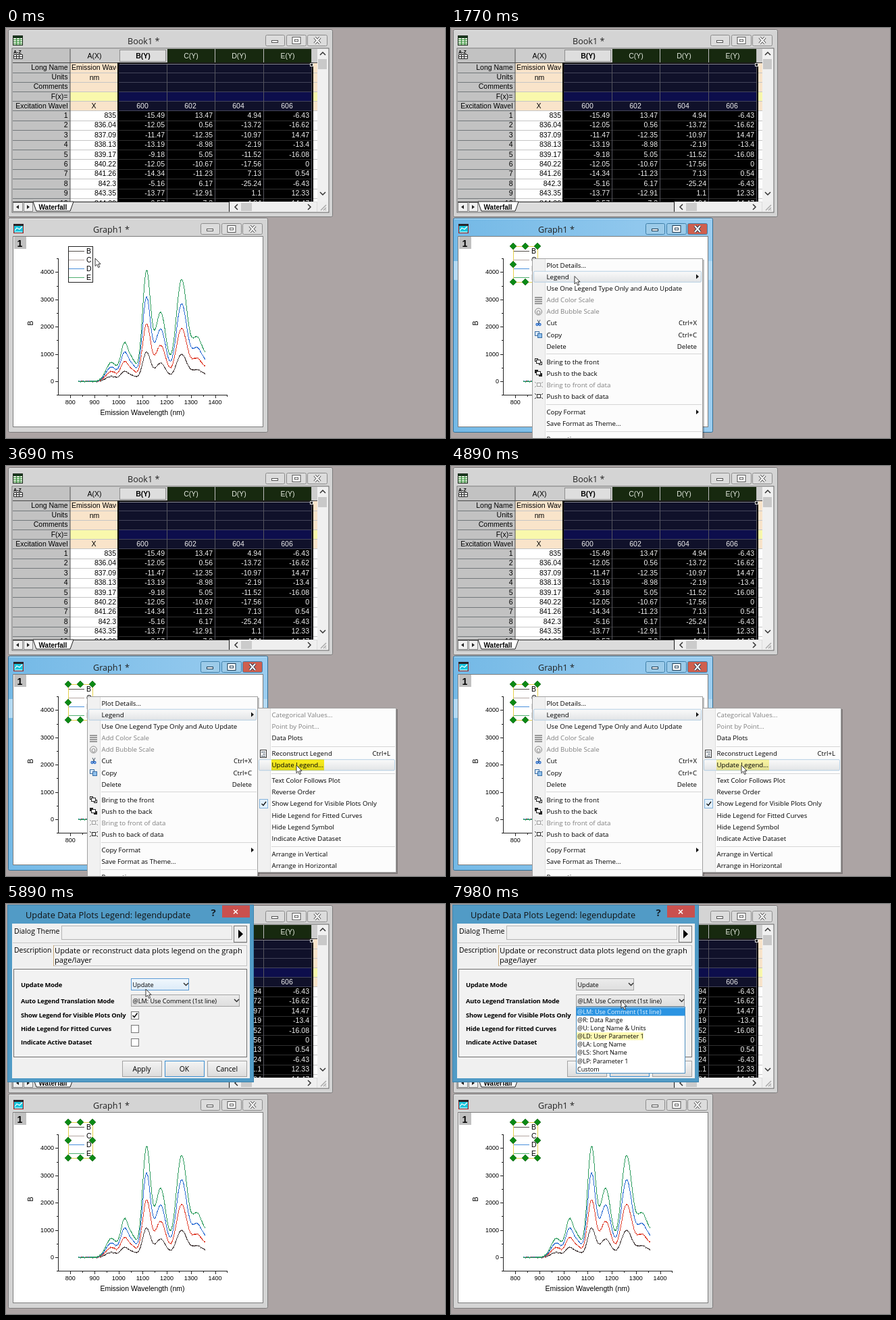
Recreate the animation shown at these times as an HTML page. Size 650 by 607 pixels, loop 8 s.

```html
<!DOCTYPE html>
<html lang="en">
<head>
<meta charset="utf-8">
<title>Legend update</title>
<style>
html, body { margin: 0; width: 100%; height: 100%; overflow: hidden; background: #aca4a4; }
svg { display: block; width: 100vw; height: 100vh; }
text { white-space: pre; }
.ui { font-family: "Open Sans", "Noto Sans", sans-serif; }
.grid { font-family: "Liberation Sans", Arial, sans-serif; }
.mark { mix-blend-mode: multiply; fill: #fff21c; }
</style>
</head>
<body>
<svg id="stage" viewBox="0 0 650 607" xmlns="http://www.w3.org/2000/svg"></svg>
<script>
const LOOP = 8000;

// --- drawing helpers ---
const rect = (x, y, w, h, fill, stroke = 'none', extra = '') =>
  `<rect x="${x}" y="${y}" width="${w}" height="${h}" fill="${fill}" stroke="${stroke}" ${extra}/>`;
const box = (x, y, w, h, fill, stroke, extra) => rect(x + .5, y + .5, w - 1, h - 1, fill, stroke, extra);
const path = (d, stroke, width = 1, fill = 'none', extra = '') =>
  `<path d="${d}" stroke="${stroke}" stroke-width="${width}" fill="${fill}" ${extra}/>`;
const text = (x, y, s, size, { cls = 'ui', fill = '#000', anchor = 'start', weight = 400, extra = '' } = {}) =>
  `<text x="${x}" y="${y}" class="${cls}" font-size="${size}" fill="${fill}" text-anchor="${anchor}" font-weight="${weight}" ${extra}>${s}</text>`;
const cell = (x, y, s, o = {}) => text(x, y, s, o.size || 10.5, { cls: 'grid', ...o });
const group = (id, body, extra = '') => `<g id="${id}" ${extra}>${body}</g>`;
const hline = (x1, x2, y, c) => path(`M${x1} ${y}H${x2}`, c);
const vline = (x, y1, y2, c) => path(`M${x} ${y1}V${y2}`, c);
const gradient = (id, from, to, x2 = 0) =>
  `<linearGradient id="${id}" x2="${x2}" y2="${1 - x2}"><stop stop-color="${from}"/><stop offset="1" stop-color="${to}"/></linearGradient>`;

const defs = `<defs>
  ${gradient('button', '#f4f4f4', '#dcdcdc')}${gradient('combo', '#ececec', '#dedede')}
  ${gradient('comboHot', '#f0f7fd', '#dcebf8')}${gradient('hover', '#fafafa', '#e2e4e6')}
  ${gradient('activeFrame', '#74b9e6', '#9bcdf0', 1)}
  <clipPath id="sheet"><rect x="10" y="31" width="451" height="226"/></clipPath>
  <clipPath id="nameCell"><rect x="96" y="52" width="67.5" height="14"/></clipPath>
  <clipPath id="dropClip"><rect id="dropArea" x="184" y="152" width="165" height="102"/></clipPath>
</defs>`;

// --- windows ---
function frame(x, y, w, h, title, titleX, active) {
  const r = x + w, ink = active ? '#1c3a52' : '#555';
  const button = (bx, bw, fill) => box(bx, y + 8, bw, 17, fill, active ? '#3f7fa8' : '#8c8c8c', 'rx="2"');
  const plain = active ? '#9ccbe9' : '#dcdcdc';
  return box(x, y, w, h, active ? 'url(#activeFrame)' : '#d4d4d4', active ? '#2f6f98' : '#7c7c7c', 'rx="2"')
    + hline(x + 2, r - 2, y + 1.5, active ? '#c4e3f6' : '#ededed')
    + button(r - 100, 29, plain) + button(r - 69, 30, plain) + button(r - 38, 30, active ? '#cf5f4e' : plain)
    + rect(r - 90.5, y + 16.5, 9, 3, '#fff', ink)
    + rect(r - 60, y + 11.5, 12, 10, '#fff', ink) + rect(r - 56.5, y + 15, 5, 3, 'none', ink)
    + path(`M${r - 27} ${y + 12}l8 9m0-9l-8 9`, ink, 4) + path(`M${r - 27} ${y + 12}l8 9m0-9l-8 9`, '#fff', 2)
    + text(titleX, y + 21.5, title, 12.6, { fill: '#222' });
}

function book() {
  const top = 122.3, pitch = 14.4;
  const columns = [167, 238, 309, 381, 452];
  const rows = `835 -15.49 13.47 4.94 -6.43|836.04 -12.05 0.56 -13.72 -16.62|837.09 -11.47 -12.35 -10.97 14.47
838.13 -13.19 -8.98 -2.19 -13.4|839.17 -9.18 5.05 -11.52 -16.08|840.22 -12.05 -10.67 -17.56 0
841.26 -14.34 -11.23 7.13 0.54|842.3 -5.16 6.17 -25.24 -6.43|843.35 -13.77 -12.91 1.1 12.33
844.39 -0.57 7.3 -4.94 14.47`.split(/[|\n]/).map(r => r.split(' '));
  const labels = ['Long Name', 'Units', 'Comments', 'F(x)=', 'Excitation Wavel'];
  const headY = i => 62 + i * 14.2;
  let s = frame(3, 2, 481, 278, 'Book1 *', 180, false) + rect(9, 30, 469, 243, '#f0f0f0', '#666');
  let g = rect(10, 31, 85, 226, '#c2c2c2') + rect(95, 31, 366, 21, '#cdcdcd')
    + rect(95, 52, 366, 71, '#f9e4ca') + rect(95, 94, 366, 14, '#f9f8ac') + rect(95, 122, 366, 135, '#fff')
    + rect(167, 52, 286, 71, '#10112a') + rect(167, 94, 286, 14, '#0d0e4c') + rect(167, 122, 286, 135, '#000')
    + rect(238, 31, 215, 20, '#17290f')
    + rect(168.5, 32.5, 68, 17, '#dedede', '#444', 'stroke-dasharray="1 1"');
  for (let i = 0; i < 15; i++) {
    const y = Math.round(i < 5 ? 66 + i * 14.1 : top + (i - 4) * pitch) + .5;
    g += hline(10, 95, y, '#72777a') + hline(95, 167, y, '#c6c6c6') + hline(167, 453, y, i < 5 ? '#44455a' : '#303030') + hline(453, 461, y, '#c6c6c6');
  }
  g += hline(10, 461, 51.5, '#444') + vline(95, 31, 257, '#555');
  columns.slice(1).forEach(x => g += vline(x + .5, 31, 51, '#bbb') + vline(x + .5, 52, 257, '#55555e'));
  // selection outline
  g += path('M166 257V52.5H454V257', '#000', 2) + hline(168, 451, 53.5, '#8a8a94');
  ['A(X)', 'B(Y)', 'C(Y)', 'D(Y)', 'E(Y)'].forEach((h, i) =>
    g += cell(i ? columns[i - 1] + 36 : 131, 45, h, { anchor: 'middle', fill: i > 1 ? '#e4eadf' : '#000', weight: i == 1 ? 700 : 400 }));
  labels.forEach((l, i) => g += cell(91.5, headY(i), l, { anchor: 'end' }));
  g += `<g clip-path="url(#nameCell)">${cell(97, 62, 'Emission Wavelength')}</g>`
    + cell(131, 77, 'nm', { anchor: 'middle' }) + cell(130, 119, 'X', { anchor: 'middle' });
  [600, 602, 604, 606].forEach((n, i) => g += cell(columns[i] + 35, 119, n, { anchor: 'middle', fill: '#eee' }));
  rows.forEach((row, r) => {
    const y = 133 + r * pitch;
    g += cell(91.5, y, r + 1, { anchor: 'end' });
    row.forEach((v, c) => g += cell(c ? columns[c] - 3 : 163, y, v, { anchor: 'end', fill: c ? '#f2f2f2' : '#000' }));
  });
  s += `<g clip-path="url(#sheet)">${g}</g>` + box(450, 52, 5, 5, '#111', '#ddd');
  // sort icon
  s += text(11, 38, 'A-Z', 7, { cls: 'grid', weight: 700 })
    + path('M11.5 39.5h13v6h-13zM15.5 39.5v6M19.5 39.5v6M11.5 42.5h13', '#222', 1, '#fff');
  // scroll bars and sheet tab
  s += rect(461, 31, 16, 226, '#f0f0f0') + rect(462, 46, 13, 15, '#c9c9c9')
    + path('M465 40l4-4 4 4M465 243l4 4 4-4', '#333', 1.5)
    + rect(10, 257, 451, 15, '#dcdcdc') + hline(10, 330, 257.5, '#222')
    + box(10, 258, 15, 14, '#f0f0f0', '#888') + box(26, 258, 14, 14, '#f0f0f0', '#888')
    + path('M19 262v6l-4-3zM31 262v6l4-3z', 'none', 0, '#222')
    + path('M40 257l5 14H95l5-14z', '#222', 1, '#fff') + text(48.5, 268.5, 'Waterfall', 10, { cls: 'grid', weight: 700 })
    + vline(330.5, 257, 272, '#222') + rect(332, 258, 128, 14, '#efefef') + rect(348, 259, 16, 12, '#cbcbcb')
    + path('M343 261l-4 4 4 4M447 261l4 4-4 4', '#333', 1.5)
    + rect(461, 257, 16, 15, '#eee') + path('M466 270l8-8M470 270l4-4M473 270l1-1', '#aaa', 1.5);
  // title icon
  return s + box(10, 11, 15, 15, '#e6f2e0', '#1c2a1c') + rect(11, 12, 13, 3, '#1c3a20')
    + path('M11 17.5h13M11 20.5h13M11 23.5h13M15.5 15v10M20.5 15v10', '#2f8a35');
}

// Emission spectrum: sum of Gaussian peaks in pixels above the zero line.
const peaks = [[156, 28, 8], [175, 50, 5.5], [187, 30, 6.5], [208, 161, 6], [229, 102, 8], [260, 150, 8.2], [283, 62, 8], [300, 30, 7]];
function curve(scale, color, seed) {
  let d = '';
  for (let x = 107; x <= 295; x += .5) {
    const h = peaks.reduce((a, [c, amp, s]) => a + amp * Math.exp(-(((x - c) / s) ** 2) / 2), 0);
    const noise = Math.sin(x * 7.3 + seed) * .35 + Math.sin(x * 3.1 + seed * 2) * .35;
    d += `${d ? 'L' : 'M'}${x} ${(523.3 - h * scale + noise).toFixed(1)}`;
  }
  return path(d, color, 1, 'none', 'shape-rendering="crispEdges"');
}

const series = [['B', '#4d4343', .265], ['C', '#e0402f', .52], ['D', '#2a6cd4', .76], ['E', '#2f9d5f', 1]];
const legendInk = ['#55504c', '#b4a6a2', '#4a90dc', '#4fae70'];

function graphBody() {
  let s = box(10, 308, 371, 283, '#fff', '#7c7c7c')
    + box(11, 290, 15, 14, '#18c4dc', '#a22') + rect(11, 290, 15, 3, '#2a2226') + path('M13 300l3-4 4 2 4-4M13 302h11', '#fff', 1.2)
    + rect(12, 309, 18, 18, '#c0c0c0') + text(20.5, 323.5, '1', 14, { cls: 'grid', weight: 700, anchor: 'middle' });
  s += vline(77.5, 342, 544, '#222') + hline(77, 328, 543.5, '#222');
  for (let i = 0; i < 5; i++) {
    const y = 523 - i * 40.4;
    s += hline(73, 78, Math.round(y) + .5, '#222') + hline(75, 78, Math.round(y + 20.2) + .5, '#222')
      + cell(71, y + 3, i * 1000, { anchor: 'end', size: 9 });
  }
  s += hline(75, 78, 341.5, '#222');
  for (let i = 0; i < 7; i++) {
    const x = 95.3 + i * 35.7;
    s += vline(Math.round(x) + .5, 544, 548, '#222') + vline(Math.round(x + 17.8) + .5, 544, 546, '#222')
      + cell(x, 557, 800 + i * 100, { anchor: 'middle', size: 9 });
  }
  s += cell(202, 573, 'Emission Wavelength (nm)', { anchor: 'middle' })
    + cell(0, 0, 'B', { anchor: 'middle', extra: 'transform="translate(39.5 437) rotate(-90)"' });
  series.forEach(([, color, k], i) => s += curve(k, color, i * 1.7));
  s += group('legendBox', box(92, 323, 37, 54, '#fff', '#222'));
  series.forEach(([name], i) => s += hline(93, 116, 330.5 + i * 13, legendInk[i]) + cell(119, 334 + i * 13, name));
  let h = rect(92.5, 323.5, 36, 53, 'none', '#e6d04c');
  for (const x of [92, 110, 128]) for (const y of [323, 350, 376])
    if (x != 110 || y != 350) h += path(`M${x} ${y - 5}l5 5-5 5-5-5z`, '#0c5c10', .6, '#0b8a14');
  return s + group('handles', h);
}

const graph = () =>
  group('graphIdle', frame(3, 281, 385, 318, 'Graph1 *', 129, false))
  + group('graphActive', frame(3, 281, 385, 318, 'Graph1 *', 129, true) + rect(4, 345, 6, 28, '#b4daf3') + rect(381, 345, 6, 28, '#b4daf3'))
  + graphBody();

// --- menus: [baseline, label, shortcut, disabled] ---
const menuItems = [[354.5, 'Plot Details...'], [371.7, 'Legend'], [389, 'Use One Legend Type Only and Auto Update'],
  [406, 'Add Color Scale', '', 1], [423.2, 'Add Bubble Scale', '', 1], [440.3, 'Cut', 'Ctrl+X'], [457.5, 'Copy', 'Ctrl+C'],
  [474.6, 'Delete', 'Delete'], [497.5, 'Bring to the front'], [514.6, 'Push to the back'], [531.8, 'Bring to front of data', '', 1],
  [549, 'Push to back of data'], [572, 'Copy Format'], [589.2, 'Save Format as Theme...'], [612, 'Properties...']];
const subItems = [[371.7, 'Categorical Values...', '', 1], [389, 'Point by Point...', '', 1], [406, 'Data Plots'],
  [429, 'Reconstruct Legend', 'Ctrl+L'], [446.2, 'Update Legend...'], [469, 'Text Color Follows Plot'], [486.2, 'Reverse Order'],
  [503.4, 'Show Legend for Visible Plots Only'], [520.5, 'Hide Legend for Fitted Curves'], [537.7, 'Hide Legend Symbol'],
  [555, 'Indicate Active Dataset'], [578, 'Arrange in Vertical'], [595, 'Arrange in Horizontal']];

function menuPanel(x, y, w, h, items, seps, hoverId) {
  let s = rect(x + 2, y + 2, w, h, '#000', 'none', 'opacity=".25"') + box(x, y, w, h, '#fcfcfc', '#a0a0a0')
    + rect(x + 1, y + 1, 18, h - 2, '#f1f1f1') + vline(x + 19.5, y + 1, y + h - 1, '#dedede');
  seps.forEach(v => s += hline(x + 21, x + w - 2, v, '#d6d6d6'));
  s += `<rect id="${hoverId}" x="${x + 2.5}" width="${w - 5}" height="16" rx="1.5" fill="url(#hover)" stroke="#b4cfe4"/>`;
  items.forEach(([b, label, keys = '', off]) => {
    s += text(x + 21.5, b, label, 9.7, { fill: off ? '#808080' : '#000' });
    if (keys) s += text(x + w - 9, b, keys, 9.7, { anchor: 'end' });
  });
  return s;
}

function menuIcons() {
  let s = '';
  for (let i = 0; i < 4; i++) s += rect(124, 398 + i * 3, 11, 2, '#999');
  s += '<circle cx="129.5" cy="420" r="5" fill="none" stroke="#888"/><circle cx="129.5" cy="421" r="2.5" fill="none" stroke="#888"/>'
    + path('M128 432l3 6M132 432l-3 6', '#456') + path('M126 439a1.5 1.5 0 1 0 3 0a1.5 1.5 0 1 0-3 0M130 439a1.5 1.5 0 1 0 3 0a1.5 1.5 0 1 0-3 0', '#2267c8', 1.3)
    + rect(124.5, 449.5, 6, 6, '#dcebf9', '#3a6ea5') + rect(128.5, 452.5, 6, 6, '#8fc0ec', '#3a6ea5');
  [494, 511, 528, 545].forEach((y, i) => {
    const c = i == 2 ? '#999' : '#222';
    s += i < 2
      ? rect(124.5, y - 4.5, 4, 4, i ? '#222' : '#fff', c) + rect(130.5, y + .5, 4, 4, i ? '#222' : '#fff', c) + rect(126.5, y - 2.5, 6, 5, '#fff', c)
      : rect(127.5, y - 2.5, 5, 5, '#fff', c) + path(`M124 ${y - 4}l2 2m-2 6l2-2m10-6l-2 2m2 6l-2-2`, c);
  });
  return s + path('M363 364.5v7l4-3.5zM363 565v7l4-3.5z', 'none', 0, '#111');
}

const menus = () =>
  group('menu', menuPanel(120, 341, 253, 280, menuItems, [482.5, 557.5, 597.5], 'menuHover') + menuIcons())
  + group('submenu', menuPanel(372, 358, 206, 244, subItems, [415.5, 455.5, 563.5], 'subHover')
    + box(376, 420, 10, 12, '#fff', '#333') + path('M378 423.5h6M380 426.5h4M378 429.5h6', '#345')
    + box(375, 493, 13, 14, '#e3f0fb', '#86b4dc') + path('M378.5 500l2.5 2.5 4-5.5', '#111', 1.3))
  + rect(393, 434.5, 78, 16, '#fff21c', 'none', 'id="menuMark" class="mark"');

// --- dialog ---
const choices = ['@LM: Use Comment (1st line)', '@R: Data Range', '@U: Long Name &amp; Units', '@LD: User Parameter 1',
  '@LA: Long Name', '@LS: Short Name', '@LP: Parameter 1', 'Custom'];

function dialog() {
  const label = (y, s) => text(22, y, s, 9.4, { weight: 700, extra: 'letter-spacing="-.15"' });
  const combo = (id, y, w, s) =>
    `<rect id="${id}" x="185.5" y="${y + .5}" width="${w}" height="17"/>`
    + text(187.5, y + 12.5, s, 9.1) + path(`M${178 + w} ${y + 7}l3.5 3.5 3.5-3.5`, '#333', 1.5);
  const button = (x, s, edge) => box(x, 232, 59, 24, 'url(#button)', edge) + text(x + 29, 248, s, 10.4, { anchor: 'middle' });
  let s = rect(2.5, 1.5, 364, 262, '#519bc6', '#3d83ac') + rect(9, 29, 352, 229, '#f0f0f0')
    + text(29, 21, 'Update Data Plots Legend: legendupdate', 12.8, { fill: '#111' })
    + text(307, 18, '?', 15, { weight: 700, anchor: 'middle', fill: '#16222c' })
    + rect(320, 2, 41, 18, '#c9504e') + path('M337 8.5l6 6m0-6l-6 6', '#fff', 1.5)
    + text(12, 44, 'Dialog Theme', 10.5) + box(82, 32, 253, 21, '#f0f0f0', '#b4b4b4')
    + box(337, 32, 20, 25, '#ededed', '#777') + path('M344 38v13l7-6.5z', 'none', 0, '#000')
    + hline(10, 357, 57.5, '#c8c8c8')
    + text(12, 72, 'Description', 10.4) + box(70, 61, 287, 31, '#f3f3f3', '#c4c4c4') + vline(70.5, 61, 92, '#c9a878')
    + text(72, 73, 'Update or reconstruct data plots legend on the graph', 11.2) + text(72, 87, 'page/layer', 11.2)
    + box(11, 96, 346, 131, '#f2f2f2', '#707070')
    + label(123, 'Update Mode') + label(147, 'Auto Legend Translation Mode') + label(168, 'Show Legend for Visible Plots Only')
    + label(188, 'Hide Legend for Fitted Curves') + label(208, 'Indicate Active Dataset')
    + combo('modeCombo', 110, 85, 'Update') + combo('transCombo', 134, 160, choices[0]);
  [159, 179, 199].forEach(y => s += box(185, y, 12, 12, '#fff', '#777'));
  s += path('M187.5 165l2.5 2.5 4.5-6', '#111', 1.6);
  return s + button(172, 'Apply', '#a2a2a2') + button(235, 'OK', '#3b8ed0') + button(298, 'Cancel', '#a2a2a2');
}

function dropdown() {
  let s = box(185, 152, 162, 99, '#fff', '#4d8fc0') + rect(186, 153.5, 160, 12, '#2b94e2');
  choices.forEach((c, i) => s += text(187, 162.7 + i * 12.15, c, 9.1, { fill: i ? '#000' : '#e4f3ff' }));
  return s + rect(186, 190, 99, 11.5, '#fff21c', 'none', 'id="listMark" class="mark"');
}

document.getElementById('stage').innerHTML = defs + rect(0, 0, 650, 607, '#aca4a4') + book() + graph() + menus()
  + group('dialog', dialog()) + group('dropdown', dropdown(), 'clip-path="url(#dropClip)"')
  + group('cursor', path('M0 0V11.5L2.7 9l2 4.6 2-.9-2-4.4H8z', '#222', .9, '#fff'));

// --- motion ---
const el = Object.fromEntries([...document.querySelectorAll('#stage [id]')].map(e => [e.id, e]));
const show = (id, on) => el[id].setAttribute('display', on ? 'inline' : 'none');
const ramp = (t, a, b) => Math.min(1, Math.max(0, (t - a) / (b - a)));
const ease = k => k * k * (3 - 2 * k);

// [start, end, x, y] of each pointer move
const moves = [[160, 600, 120, 341], [1260, 1770, 183, 367.5], [2090, 2880, 424, 376], [2910, 3690, 430, 443],
  [5130, 5430, 207, 126], [5890, 6660, 252, 143]];
function pointer(t) {
  let x = 132, y = 341;
  for (const [a, b, tx, ty] of moves) {
    const k = ease(ramp(t, a, b));
    x += (tx - x) * k;
    y += (ty - y) * k;
  }
  return [x, y];
}

function hover(id, item) {
  show(id, item);
  if (item) el[id].setAttribute('y', item[0] - 11.5);
}
const itemAt = (items, y) => items.find(([b, , , off]) => !off && y >= b - 12 && y < b + 5);

function comboHot(id, hot) {
  el[id].setAttribute('fill', hot ? 'url(#comboHot)' : 'url(#combo)');
  el[id].setAttribute('stroke', hot ? '#5b9bd5' : '#a3a3a3');
}

function render(t) {
  const [x, y] = pointer(t);
  const active = t >= 600 && t < 5160, menuOpen = t >= 880 && t < 5100, subOpen = t >= 1815 && t < 5100;
  el.cursor.setAttribute('transform', `translate(${x.toFixed(2)} ${y.toFixed(2)})`);
  show('graphActive', active);
  show('graphIdle', !active);
  show('handles', t >= 800);
  show('legendBox', t < 800);
  show('menu', menuOpen);
  show('submenu', subOpen);
  hover('menuHover', subOpen ? menuItems[1] : x > 121 && itemAt(menuItems, y));
  hover('subHover', x > 373 && itemAt(subItems, y));
  el.menuMark.setAttribute('opacity', ramp(t, 2090, 2880) * (1 - ramp(t, 4320, 5280)));

  const open = ease(ramp(t, 5130, 5400)), size = .9 + .1 * open;
  show('dialog', t >= 5130);
  el.dialog.setAttribute('opacity', open);
  el.dialog.setAttribute('transform', `translate(184 132) scale(${size}) translate(-184 -132)`);
  comboHot('modeCombo', y < 129);
  comboHot('transCombo', y >= 134 && t < 6720);

  show('dropdown', t >= 6720);
  el.dropArea.setAttribute('height', 102 * ramp(t, 6690, 6960));
  el.listMark.setAttribute('opacity', ramp(t, 7770, 8400));
}

const start = performance.now();
function tick() {
  render((performance.now() - start) % LOOP);
  requestAnimationFrame(tick);
}
tick();
</script>
</body>
</html>
```
